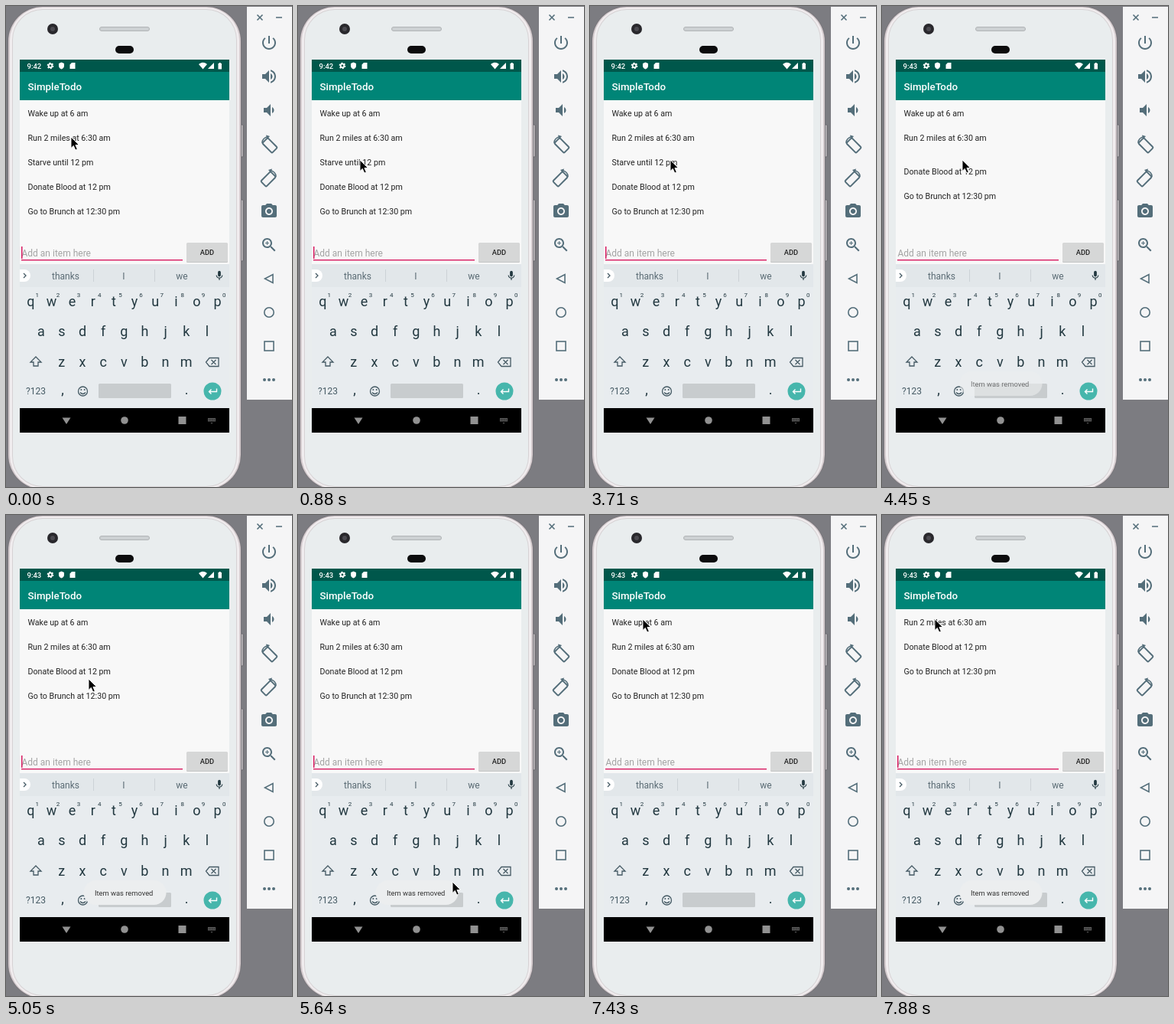
An HTML page that plays this animation: 374 by 628 pixels, repeating every 8000 ms.

```html
<!DOCTYPE html>
<html lang="en">
<head>
<meta charset="utf-8">
<title>SimpleTodo</title>
<style>
html, body { margin: 0; width: 100%; height: 100%; overflow: hidden; background: #7c7c81; }
svg { display: block; font-family: Roboto, "Open Sans", sans-serif; }
.mid { text-anchor: middle; }
.bold { font-weight: 500; }
.line { fill: none; stroke: #546e7a; stroke-width: 1.6; }
.thin { fill: none; stroke: #455a64; stroke-width: 1.3; }
</style>
</head>
<body>
<svg width="374" height="628" viewBox="0 0 374 628">
  <!-- phone body -->
  <rect x="306" y="155" width="4" height="42" rx="1" fill="#c9c5c8" stroke="#66656a"/>
  <rect x="306" y="253" width="4" height="80" rx="1" fill="#c9c5c8" stroke="#66656a"/>
  <rect x="2" y="0" width="306" height="632" rx="46" fill="#77757a"/>
  <rect x="3" y="1" width="304" height="630" rx="45" fill="#d3cacd"/>
  <rect x="5" y="2" width="300" height="628" rx="43" fill="#f1edef"/>
  <rect x="8" y="4" width="294" height="624" rx="40" fill="#d6d2d4"/>
  <rect x="9" y="5" width="292" height="622" rx="39" fill="#e9edee"/>
  <circle cx="61" cy="30" r="7" fill="#29282c"/>
  <circle cx="61" cy="30" r="3" fill="#4b4a50"/>
  <rect x="122.500" y="27.500" width="65" height="5" rx="2.500" fill="#cdd1d3" stroke="#b0b3b5"/>
  <rect x="143" y="52" width="24" height="10" rx="5" fill="#0c0c0d"/>

  <!-- app -->
  <rect x="18" y="70" width="274" height="487" fill="#f8f8f8"/>
  <rect x="18" y="70" width="274" height="16" fill="#00574b"/>
  <rect x="18" y="86" width="274" height="37" fill="#008577"/>
  <g fill="#fff">
    <text id="clock" class="bold" x="27.500" y="81.500" font-size="9.500"></text>
    <circle cx="58" cy="78" r="2.300" fill="none" stroke="#fff" stroke-width="1.800"/>
    <circle cx="58" cy="78" r="3.700" fill="none" stroke="#fff" stroke-width="1.300" stroke-dasharray="1.900 1.975"/>
    <path d="M72.500 73.500l3.500 1.500v3q0 3-3.500 4.500q-3.500-1.500-3.500-4.500v-3zM86 74h4.500v8h-7v-5.500z"/>
    <path d="M252 76q5.500-4.500 11 0l-5.500 6.500zM272 74v8h-8zM277.500 75h1.200v-1h2v1h1.300v7.500h-4.500z"/>
    <text class="bold" x="28.500" y="109.500" font-size="13.330">SimpleTodo</text>
  </g>
  <g id="list" font-size="10.670" fill="#222"></g>
  <text x="20.500" y="326.500" font-size="12" fill="#a3a3a3">Add an item here</text>
  <rect x="20" y="331" width="211" height="1.400" fill="#d81b60"/>
  <rect id="caret" x="20" y="314" width="1.500" height="16" fill="#d81b60"/>
  <rect x="236" y="310" width="54" height="25" rx="1.500" fill="#c4c5c5"/>
  <rect x="236" y="309" width="54" height="25" rx="1.500" fill="#d6d7d7"/>
  <text class="mid bold" x="263" y="325" font-size="9.330" fill="#222">ADD</text>

  <!-- keyboard -->
  <rect x="18" y="337" width="274" height="188" fill="#e8ecef"/>
  <rect x="18" y="337" width="274" height="30" fill="#e2e7ea"/>
  <path d="M18 344h6a8 8 0 0 1 0 16h-6z" fill="#fff"/>
  <path class="thin" d="M23 349l3 3l-3 3"/>
  <path d="M114.500 344v16M194.500 344v16" stroke="#ccd2d6"/>
  <g class="mid" font-size="12" fill="#5a6b74">
    <text x="78" y="356.500">thanks</text><text x="154" y="356.500">I</text><text x="230" y="356.500">we</text>
  </g>
  <g id="keys" class="mid" fill="#223840"></g>
  <path class="thin" d="M39 458l7 7h-4v5h-6v-5h-4zM266 459.500h12v11h-12l-4.500-5.500zM268.500 462l6 6m0-6l-6 6"/>
  <text x="26" y="507" font-size="12" fill="#455a64">?123</text>
  <circle class="thin" cx="100.500" cy="503" r="6"/>
  <path class="thin" d="M97 504.500q3.500 4 7 0"/>
  <circle cx="98.300" cy="501" r="1" fill="#455a64"/><circle cx="102.700" cy="501" r="1" fill="#455a64"/>
  <rect x="121" y="493" width="95" height="19" rx="1.500" fill="#c8ccce"/>
  <circle cx="270" cy="503" r="11.500" fill="#46b6ac"/>
  <path d="M275.500 499.500v4h-10m3-3l-3 3l3 3" fill="none" stroke="#fff" stroke-width="1.400"/>

  <!-- navigation bar -->
  <rect x="18" y="525" width="274" height="32" fill="#000"/>
  <g fill="#919191">
    <path d="M73.500 537.500h11l-5.500 8.500z"/><circle cx="155" cy="541" r="4.800"/><rect x="225.500" y="536" width="10" height="10"/>
    <path d="M264 538h10v4.500h-10zM267.500 544h3l-1.500 1.500z" fill="#606060"/>
    <path d="M265 539.500h8M265 541.200h8" stroke="#000" stroke-width=".8" stroke-dasharray="1 .75"/>
  </g>

  <g id="toast">
    <rect x="101.500" y="477" width="108" height="32" rx="16" fill="#eceeef"/>
    <text x="116" y="496.500" font-size="9.330" fill="#333">Item was removed</text>
  </g>

  <!-- side toolbar -->
  <rect x="315" y="1" width="59" height="513" fill="#f5f5f6"/>
  <path class="line" d="M328.500 11.500l7 7m0-7l-7 7M353 15h8"/>
  <g id="icons" fill="#546e7a"></g>
  <path class="line" d="M349 350.500v11l-10.500-5.500z"/>
  <circle class="line" cx="344" cy="400" r="6.200"/>
  <rect class="line" x="338" y="438" width="12" height="12"/>
  <g fill="#546e7a"><circle cx="338" cy="488" r="2"/><circle cx="344" cy="488" r="2"/><circle cx="350" cy="488" r="2"/></g>
  <g id="turn" transform="translate(344 180)">
    <rect class="line" x="-9" y="-5" width="18" height="10" rx="1.500" style="stroke-width:2" transform="translate(1 2) rotate(45)"/>
    <path class="line" d="M-9 -1Q-9 -8 -1 -9.500"/>
    <path d="M-4 -11.500l5 1.500l-3.500 4z" fill="#546e7a"/>
  </g>
  <use href="#turn" transform="translate(688 44) scale(-1 1)"/>

  <path id="cursor" d="M0 0V14.500L3.300 11.400L5.800 17L8.300 16L5.900 10.500H10.500Z" fill="#000" stroke="#fff" stroke-width=".9"/>
</svg>
<script>
const $ = id => document.getElementById(id);

function add(parent, tag, attrs, text = '') {
  const el = document.createElementNS('http://www.w3.org/2000/svg', tag);
  for (const k in attrs) el.setAttribute(k, attrs[k]);
  el.textContent = text;
  return $(parent).appendChild(el);
}

const icon = (parent, x, y, size, d) => add(parent, 'path', {
  d, transform: `translate(${x} ${y}) scale(${size / 24}) translate(-12 -12)`, 'fill-rule': 'evenodd'
});

[
  [48, 'M13 3h-2v10h2V3zm4.83 2.17l-1.42 1.42C17.99 7.86 19 9.81 19 12c0 3.87-3.13 7-7 7s-7-3.13-7-7c0-2.19 1.01-4.14 2.58-5.42L6.17 5.17C4.23 6.82 3 9.26 3 12c0 4.97 4.03 9 9 9s9-4.03 9-9c0-2.74-1.23-5.18-3.17-6.83z'],
  [92, 'M3 9v6h4l5 5V4L7 9H3zm13.5 3c0-1.77-1.02-3.29-2.5-4.03v8.05c1.48-.73 2.5-2.25 2.5-4.02zM14 3.23v2.06c2.89.86 5 3.54 5 6.71s-2.11 5.85-5 6.71v2.06c4.01-.91 7-4.49 7-8.77s-2.99-7.86-7-8.77z'],
  [136, 'M18.5 12c0-1.77-1.02-3.29-2.5-4.03v8.05c1.48-.73 2.5-2.25 2.5-4.02zM5 9v6h4l5 5V4L9 9H5z'],
  [268, 'M9 2L7.17 4H4c-1.1 0-2 .9-2 2v12c0 1.1.9 2 2 2h16c1.1 0 2-.9 2-2V6c0-1.1-.9-2-2-2h-3.17L15 2H9zm3 15c-2.76 0-5-2.24-5-5s2.24-5 5-5 5 2.24 5 5-2.24 5-5 5zM12 8.8a3.2 3.2 0 1 0 .01 0z'],
  [312, 'M15.5 14h-.79l-.28-.27C15.41 12.59 16 11.11 16 9.5 16 5.91 13.09 3 9.5 3S3 5.91 3 9.5 5.91 16 9.5 16c1.61 0 3.09-.59 4.23-1.57l.27.28v.79l5 4.99L20.49 19l-4.99-5zm-6 0C7.01 14 5 11.99 5 9.5S7.01 5 9.5 5 14 7.01 14 9.5 11.99 14 9.5 14zM9 7h1v2h2v1h-2v2H9v-2H7V9h2z']
].forEach(([y, d]) => icon('icons', 344, y, 24, d));
icon('keys', 279, 352, 15, 'M12 14c1.66 0 2.99-1.34 2.99-3L15 5c0-1.66-1.34-3-3-3S9 3.34 9 5v6c0 1.66 1.34 3 3 3zm5.3-3c0 3-2.54 5.1-5.3 5.1S6.7 14 6.7 11H5c0 3.41 2.72 6.23 6 6.72V21h2v-3.28c3.28-.48 6-3.3 6-6.72h-1.7z');

const key = (x, y, ch, size = 18) => add('keys', 'text', { x, y, 'font-size': size }, ch);
[['qwertyuiop', 32.3, 391.5], ['asdfghjkl', 45.8, 431], ['zxcvbnm', 72.8, 470.5]].forEach(([row, x, y]) =>
  [...row].forEach((ch, i) => key(x + 27.15 * i, y, ch)));
[...'1234567890'].forEach((ch, i) => key(40.8 + 27.15 * i, 379.5, ch, 8));
key(74, 507, ',');
key(236, 507, '.');

const rows = ['Wake up at 6 am', 'Run 2 miles at 6:30 am', 'Starve until 12 pm', 'Donate Blood at 12 pm', 'Go to Brunch at 12:30 pm']
  .map(s => add('list', 'text', { x: 28.5 }, s));

const path = [
  [0, 85, 171], [140, 85, 176], [290, 84, 184], [440, 83, 191], [590, 82, 197], [740, 81, 200], [880, 81, 201],
  [2810, 95, 203], [2960, 118, 205], [3110, 105, 201],
  [5050, 108, 214], [5200, 121, 285], [5350, 145, 393], [5640, 202, 479],
  [5790, 250, 555], [5940, 268, 581], [6090, 225, 470], [6240, 150, 305], [6390, 92, 190], [6540, 71, 143],
  [6690, 69, 136]
];
const blinks = [140, 590, 1180, 1620, 2220, 2660, 3110, 3710, 4150, 4600, 5200, 5640, 6240, 6690, 7140, 7730];
const fades = [[0, 0], [4450, .6], [4600, 1], [6690, .5], [6840, 0], [7730, .6], [7880, 1]];
const removals = [[2, 4300], [0, 7580]];

const at = (steps, t) => steps.filter(s => s[0] <= t).pop();
const slide = dt => dt < 150 ? 0 : dt < 300 ? 20 : 32;

function draw(t) {
  const [, x, y] = at(path, t);
  $('cursor').setAttribute('transform', `translate(${x} ${y})`);
  $('caret').setAttribute('opacity', blinks.filter(b => b <= t).length % 2 ? 0 : 1);
  $('toast').setAttribute('opacity', at(fades, t)[1]);
  $('clock').textContent = t < 4150 ? '9:42' : '9:43';
  rows.forEach((el, i) => {
    let top = 143.5 + 32 * i, shown = 1;
    for (const [row, start] of removals) {
      if (i > row) top -= slide(t - start);
      if (i === row && t >= start) shown = 0;
    }
    el.setAttribute('y', top);
    el.setAttribute('opacity', shown);
  });
}

const begin = performance.now();
(function tick() {
  draw((performance.now() - begin) % 8000);
  requestAnimationFrame(tick);
})();
</script>
</body>
</html>
```
